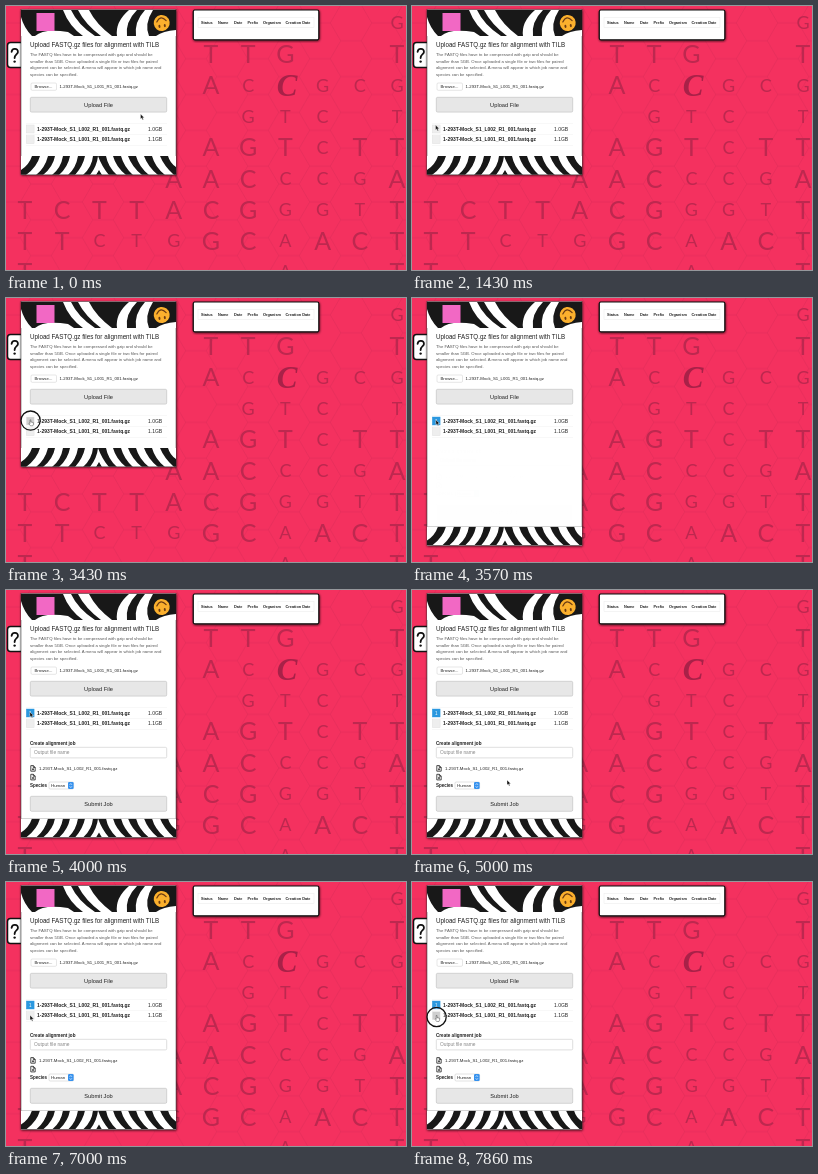
These frames come from a looping animation (400x264 px, 8 s). An HTML page:

```html
<!DOCTYPE html>
<html lang="en">
<head>
<meta charset="utf-8">
<title>File upload</title>
<style>
  html, body { margin: 0; width: 100%; height: 100%; overflow: hidden; background: #f4315f; }
  svg { display: block; width: 100vw; height: 100vh; }
  text { font-family: "Liberation Sans", Arial, sans-serif; fill: #222; }
  .bold { font-weight: bold; }
  .button { fill: #e7e7e7; stroke: #bdbdbd; stroke-width: .6; }
</style>
</head>
<body>
<svg viewBox="0 0 400 264" preserveAspectRatio="none">
  <defs>
    <pattern id="hexes" width="62" height="35.8" patternUnits="userSpaceOnUse" patternTransform="translate(4 -1)">
      <path d="M0 17.9H10.3L20.7 0H41.3L51.7 17.9H62M10.3 17.9 20.7 35.8H41.3L51.7 17.9" fill="none" stroke="#df2b59" stroke-width=".6"/>
    </pattern>
    <clipPath id="topClip"><rect x="15" y="4" width="155" height="26"/></clipPath>
    <clipPath id="footClip"><rect x="15" y="150" width="155" height="18.5"/></clipPath>
    <filter id="shadow" x="-10%" y="-10%" width="120%" height="120%">
      <feDropShadow dx="0.4" dy="0.8" stdDeviation="0.9" flood-opacity=".75"/>
    </filter>
  </defs>

  <rect width="400" height="264" fill="#f4315f"/>
  <rect width="400" height="264" fill="url(#hexes)"/>
  <g id="bases"></g>

  <g filter="url(#shadow)">
    <rect x="187.3" y="4" width="125.5" height="29.8" rx="1.5" fill="#fff" stroke="#111" stroke-width="1.2"/>
  </g>
  <rect x="192" y="11.5" width="116" height="10" fill="none" stroke="#eaeaea" stroke-width=".5"/>
  <g id="headings"></g>

  <rect x="1.5" y="36.6" width="18" height="25" rx="3" fill="#fff" stroke="#111" stroke-width="1.5"/>
  <path d="M5.6 45.8C6 41.6 12.3 42 11.9 46.1 11.6 48.5 8.5 48.5 8.6 52" fill="none" stroke="#111" stroke-width="1.8" stroke-linecap="round"/>
  <circle cx="8.6" cy="55.6" r="1.2" fill="#111"/>

  <g filter="url(#shadow)"><rect id="panel" x="15" y="3.5" width="155" fill="#fff" stroke="#333" stroke-width=".5"/></g>

  <g clip-path="url(#topClip)">
    <rect x="15" y="3" width="155" height="30" fill="#181818"/>
    <g fill="#fff">
      <path d="M15 11Q18 22 26 30H15ZM29 30Q38 22 62 26L68 30Z"/>
      <path d="M57 4H65Q72 19 89 30H77Q63 20 57 4ZM72 4H83Q90 18 106 30H95Q79 18 72 4Z"/>
      <path d="M111 30Q109 16 123 4H131Q119 16 121 30ZM130 30Q128 16 139 4H147Q138 18 143 30Z"/>
      <path d="M150 30Q157 25 170 24V30Z"/>
    </g>
  </g>
  <rect x="30.5" y="7" width="18" height="18" fill="#f268c4"/>
  <g transform="rotate(-8 155.7 17)">
    <circle cx="155.7" cy="17" r="8" fill="#fbb02d"/>
    <path d="M151 15.3Q155.7 8.3 160.4 15.3" fill="none" stroke="#6b3b12" stroke-width="1.2" stroke-linecap="round"/>
    <g fill="#6b3b12"><ellipse cx="153" cy="20" rx="1" ry="1.6"/><ellipse cx="158.4" cy="20" rx="1" ry="1.6"/></g>
  </g>

  <g id="footer"><g clip-path="url(#footClip)">
    <rect x="15" y="150" width="155" height="19" fill="#181818"/>
    <g fill="#fff">
      <path d="M15 150H26Q23 159 15 164ZM20 169Q31 161 34 150H42Q39 162 30 169Z"/>
      <path d="M37 169Q47 161 49 150H57Q55 162 46 169ZM53 169Q62 161 64 150H72Q70 162 62 169Z"/>
      <path d="M69 169Q77 160 79 150H87Q86 161 77 169ZM84 169Q91 160 92 150Q96 161 103 169H96L93 164 90 169Z"/>
      <path d="M100 150H107Q110 161 120 169H111Q102 161 100 150ZM115 150H122Q126 161 136 169H127Q118 161 115 150Z"/>
      <path d="M130 150H138Q142 161 152 169H143Q133 161 130 150ZM146 150H154Q158 160 168 169H159Q149 161 146 150ZM162 150H170V161Q164 157 162 150Z"/>
    </g>
  </g></g>

  <g id="content"></g>

  <g id="rows">
    <path d="M20 117.5H161M20 128.5H161M20 139.5H161" stroke="#f0f0f0" stroke-width=".5"/>
    <rect id="box1" x="20.3" y="119" width="7.8" height="8" stroke-width=".4"/>
    <rect id="box2" x="20.3" y="129.7" width="7.8" height="8" stroke="#ddd" stroke-width=".4"/>
    <text id="mark" x="23" y="124.7" font-size="4.6" style="fill:#fff">1</text>
  </g>

  <g id="form">
    <rect x="24.3" y="157.3" width="136.4" height="10.6" rx="1.3" fill="#fff" stroke="#c8c8c8" stroke-width=".6"/>
    <g fill="none" stroke="#222" stroke-width=".8">
      <path id="fileIcon" d="M24.8 175.6H27.4L29.2 177.4V181.2H24.8ZM27.3 175.6V177.5H29.2M27 178.2V180.3M26 179.3H28"/>
      <use href="#fileIcon" y="8.7"/>
    </g>
    <rect x="43" y="192" width="24.6" height="7" rx="1.2" fill="#fff" stroke="#c4c4c4" stroke-width=".5"/>
    <rect x="62" y="192" width="5.6" height="7" rx="1.2" fill="#3591ee"/>
    <path d="M63.6 194.9 64.8 193.5 66 194.9M63.6 196.2 64.8 197.6 66 196.2" fill="none" stroke="#fff" stroke-width=".6"/>
    <rect class="button" x="24.3" y="206.3" width="136.4" height="15" rx="1.3"/>
  </g>

  <circle id="ring" cx="24.6" stroke="#111" stroke-width="1.3" fill="#fff" fill-opacity=".3"/>
  <g id="cursor" stroke-width=".4">
    <path id="arrow" d="M0 0V5.1L1.2 4 2.1 5.9 3 5.5 2.2 3.7H3.8Z" fill="#111" stroke="#fff"/>
    <path id="hand" d="M.2 0H1V2.2L3.6 2.8V4.6L3 6H.6L-1 3.8-.4 3.3.2 3.9Z" fill="#fff" stroke="#222"/>
  </g>
</svg>
<script>
const $ = id => document.getElementById(id);
const SVG = "http://www.w3.org/2000/svg";

function add(parent, tag, attrs, text = "") {
  const node = document.createElementNS(SVG, tag);
  for (const key in attrs) node.setAttribute(key, attrs[key]);
  node.textContent = text;
  return parent.appendChild(node);
}
const label = (parent, x, y, size, text, more = {}) =>
  add(parent, "text", { x, y, "font-size": size, ...more }, text);
const bold = { class: "bold" };
const middle = { "text-anchor": "middle" };

// Background bases on a regular grid; lower case marks a small letter.
const baseRows = [
  "..........g",
  ".....TTG..T",
  ".....Ac.gcg",
  "......gtc.t",
  ".....AGTcTT",
  "....AACccgA",
  "TCTTACGggtT",
  "TTctgGCaACT",
  "T......a..T"
];
baseRows.forEach((row, j) => [...row].forEach((base, i) => {
  if (base === ".") return;
  const letter = base.toUpperCase();
  const size = base === letter ? 25 : 18;
  label($("bases"), 19 + i * 37.2, 17 + j * 31.1 + size * .36, size, letter,
    { ...middle, style: "font-family:Lato,sans-serif;fill:#bd284f" });
}));
label($("bases"), 281, 90, 31, "C",
  { ...middle, style: 'font:italic bold 31px "Liberation Serif",serif;fill:#a82148' });

[["Status", 195], ["Name", 212], ["Date", 228], ["Prefix", 241.5], ["Organism", 257], ["Creation Date", 279.5]]
  .forEach(([name, x]) => label($("headings"), x, 17.6, 3.85, name, bold));

const content = $("content"), rows = $("rows"), form = $("form");
const sample = lane => `1-293T-Mock_S1_${lane}_R1_001.fastq.gz`;

label(content, 24, 41.2, 6.27, "Upload FASTQ.gz files for alignment with TILB");
["The FASTQ files have to be compressed with gzip and should be",
 "smaller than 5GB. Once uploaded a single file or two files for paired",
 "alignment can be selected. A menu will appear in which job name and",
 "species can be specified."
].forEach((line, i) => label(content, 24, 50.2 + i * 6.6, 4.27, line, { style: "fill:#555" }));
add(content, "rect", { x: 25, y: 77, width: 25.5, height: 7.3, rx: 1.2, fill: "#fff", stroke: "#ccc", "stroke-width": .5 });
label(content, 28.5, 82.2, 4.3, "Browse...");
label(content, 53.5, 82.2, 4.3, sample("L001"));
add(content, "rect", { x: 24.3, y: 91.3, width: 136.4, height: 14.8, rx: 1.3, class: "button" });
label(content, 92.5, 100.7, 5.7, "Upload File", middle);

[["L002", "1.0GB"], ["L001", "1.1GB"]].forEach(([lane, size], i) => {
  const y = 124.6 + i * 10.5;
  label(rows, 31, y, 4.98, sample(lane), bold);
  label(rows, 142, y, 5, size);
});

label(form, 24, 154.5, 4.6, "Create alignment job", bold);
label(form, 28, 164.4, 4.85, "Output file name", { style: "fill:#888" });
label(form, 33, 179.6, 4.3, sample("L002"));
label(form, 24, 197.3, 4.5, "Species", bold);
label(form, 45, 197.2, 4.4, "Human");
label(form, 92.5, 216, 5.7, "Submit Job", middle);

const LOOP = 8000, STEP = 1000 / 7, SELECT = 3570;
const path = [
  [0, 134.5, 108], [1143, 28, 113.5], [1429, 23.5, 119], [1714, 23.8, 121.5],
  [4429, 23.8, 122], [5000, 95, 190], [5429, 177, 239], [5571, 207, 241],
  [5857, 65.5, 170.5], [6143, 24, 133], [8000, 24, 133.5]
];

function cursorAt(t) {
  const next = Math.max(1, path.findIndex(point => point[0] >= t));
  const [t0, x0, y0] = path[next - 1], [t1, x1, y1] = path[next];
  const part = (t - t0) / (t1 - t0);
  return [x0 + (x1 - x0) * part, y0 + (y1 - y0) * part];
}

function ringRadius(t) {
  const age = t - (t < SELECT ? 2856 : 7285);
  return age < 0 ? 0 : Math.min(9.6, 6.3 + age / 84);
}

function draw(time) {
  const t = Math.floor((time % LOOP + 3) / STEP) * STEP;
  const selected = t >= SELECT;
  const [x, y] = cursorAt(t);
  const radius = ringRadius(t);
  const show = (id, visible) => $(id).setAttribute("opacity", visible ? 1 : 0);

  $("panel").setAttribute("height", selected ? 244 : 165);
  $("footer").setAttribute("transform", `translate(0 ${selected ? 78.5 : 0})`);
  form.setAttribute("opacity", selected ? Math.min(1, (t - SELECT) / 428) : 0);
  show("mark", selected);

  $("box1").setAttribute("fill", selected ? "#2b98df" : radius ? "#bbb" : "#eee");
  $("box1").setAttribute("stroke", selected ? "#2b98df" : "#ddd");
  $("box2").setAttribute("fill", selected && radius ? "#bbb" : "#eee");

  show("ring", radius);
  $("ring").setAttribute("r", radius);
  $("ring").setAttribute("cy", selected ? 135 : 122.6);
  show("hand", radius);
  show("arrow", !radius);
  $("cursor").setAttribute("transform", `translate(${x} ${y})`);
}

const start = performance.now();
function tick() {
  draw(performance.now() - start);
  requestAnimationFrame(tick);
}
draw(0);
requestAnimationFrame(tick);
</script>
</body>
</html>
```
